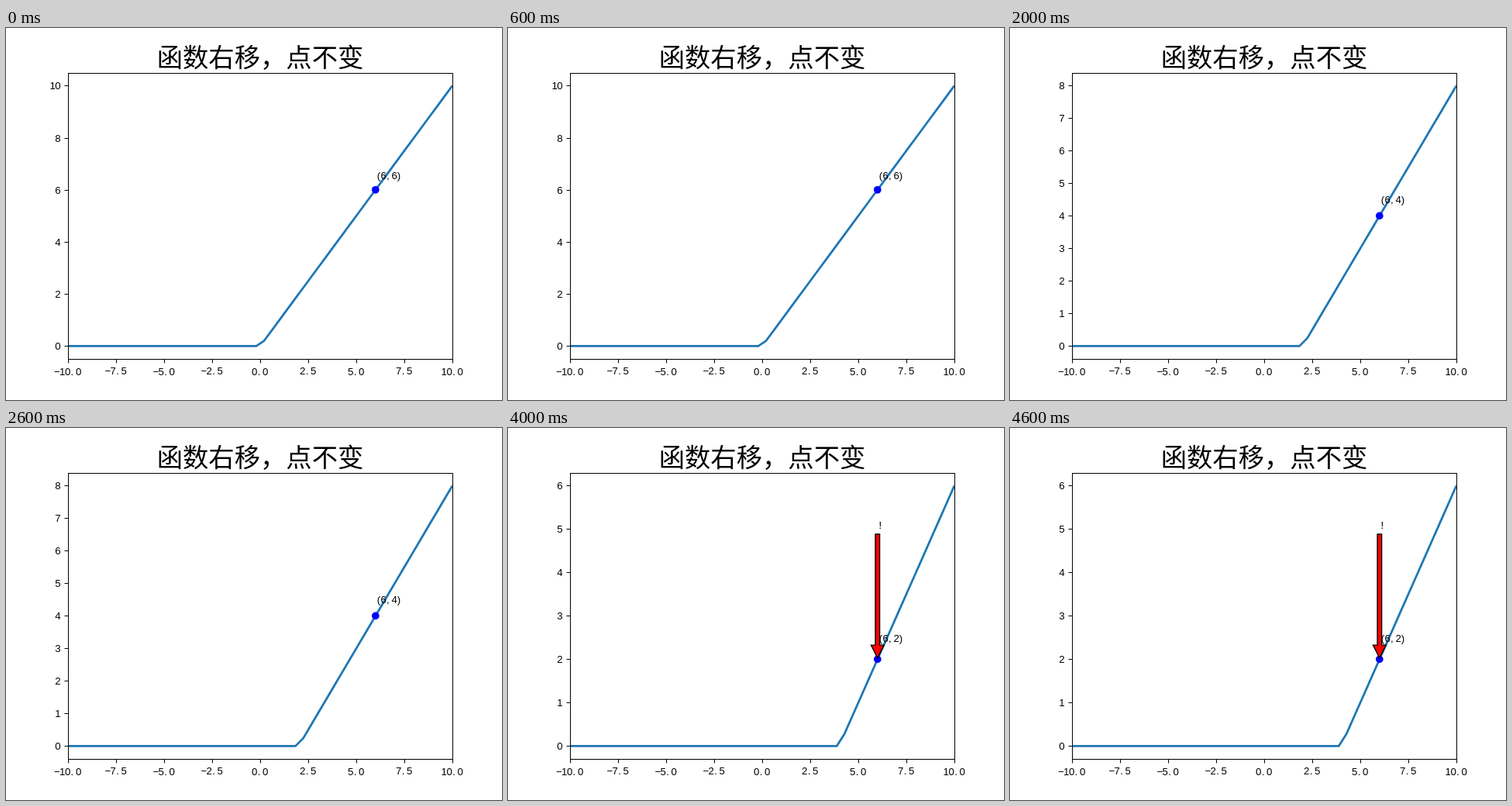
An HTML page for the animation above (5 s loop, 640 by 480 pixels).

```html
<!DOCTYPE html>
<html lang="zh-CN">
<head>
<meta charset="utf-8">
<style>
  html, body { margin: 0; width: 100%; height: 100%; overflow: hidden; background: #fff; }
  svg { display: block; width: 640px; height: 480px; }
  .title { font: 33.33px "Noto Sans CJK SC", "Noto Sans CJK", sans-serif; text-anchor: middle; }
  .label { font: 13.2px "Liberation Sans", Arial, sans-serif; text-anchor: middle; }
  .axis { fill: none; stroke: #000; stroke-width: 1; }
  .curve { fill: none; stroke: #1f77b4; stroke-width: 2.78; stroke-linejoin: round; }
  .dot { fill: #00f; }
  .arrow { fill: #f00; stroke: #000; stroke-width: 1.39; }
  .step { visibility: hidden; animation: show 5s step-end infinite; }
  @keyframes show {
    0% { visibility: visible; }
    20%, 100% { visibility: hidden; }
  }
</style>
</head>
<body>
<svg viewBox="0 0 640 480" xmlns="http://www.w3.org/2000/svg">
  <clipPath id="plot"><rect x="80" y="57.6" width="496" height="369.6"/></clipPath>
  <g id="steps"></g>
  <g id="frame"></g>
  <text class="title" x="328" y="49.5">函数右移，点不变</text>
</svg>
<script>
const NS = 'http://www.w3.org/2000/svg';
const STEPS = 5, SAMPLES = 50, POINT_X = 6;
const PITCH = 6.94;
const BASE_Y = 410.4, TOP_Y = 74.4;
// Where a narrow glyph sits off the middle of its cell
const NUDGE = { '.': -1.2, ',': -1.2, '(': 0.7, ')': -1 };

const snap = v => Math.floor(v + 0.5) + 0.5;
const toX = x => 328 + x * 24.8;

function add(parent, tag, attrs, text) {
  const el = document.createElementNS(NS, tag);
  for (const key in attrs) el.setAttribute(key, attrs[key]);
  if (text) el.textContent = text;
  parent.appendChild(el);
  return el;
}

// Fixed-pitch text starting at the given left edge
function label(parent, text, left, y) {
  const xs = [...text].map((c, i) =>
    (left + (i + 0.5) * PITCH + (NUDGE[c] || 0)).toFixed(2));
  add(parent, 'text', { class: 'label', x: xs.join(' '), y }, text);
}

function drawFrame() {
  const g = document.getElementById('frame');
  add(g, 'rect', { class: 'axis', x: 80.5, y: 58.5, width: 496, height: 369 });
  for (let x = -10; x <= 10; x += 2.5) {
    const text = x.toFixed(1).replace('-', '−');
    add(g, 'path', { class: 'axis', d: `M${snap(toX(x))} 428v4.5` });
    label(g, text, toX(x) - 0.3 - text.length * PITCH / 2, x % 5 ? 447 : 448);
  }
}

function drawStep(shift) {
  const g = add(document.getElementById('steps'), 'g', { class: 'step' });
  g.style.animationDelay = `${shift - STEPS}s`;

  const max = 10 - shift;
  const toY = y => BASE_Y - y * (BASE_Y - TOP_Y) / max;

  const points = Array.from({ length: SAMPLES }, (_, i) => {
    const x = -10 + 20 * i / (SAMPLES - 1);
    return `${toX(x).toFixed(2)},${toY(Math.max(0, x - shift)).toFixed(2)}`;
  });
  add(g, 'polyline', { class: 'curve', points: points.join(' '), 'clip-path': 'url(#plot)' });

  for (let y = 0; y <= max; y += max > 8 ? 2 : 1) {
    const text = String(y);
    add(g, 'path', { class: 'axis', d: `M75.5 ${snap(toY(y))}H80` });
    label(g, text, 70.5 - text.length * PITCH, toY(y) + 4.9);
  }

  const value = POINT_X - shift, px = toX(POINT_X);
  add(g, 'circle', { class: 'dot', cx: px, cy: toY(value), r: 4.86 });
  if (shift === STEPS - 1) {
    add(g, 'path', {
      class: 'arrow',
      d: `M${px} 296.8l-8.33 -16.67h5.55V137h5.56V280.13h5.55z`
    });
    label(g, '!', px, toY(5));
  }
  label(g, `(${POINT_X},${value})`, px, toY(value + 0.4));
}

for (let i = 0; i < STEPS; i++) drawStep(i);
drawFrame();
</script>
</body>
</html>
```
